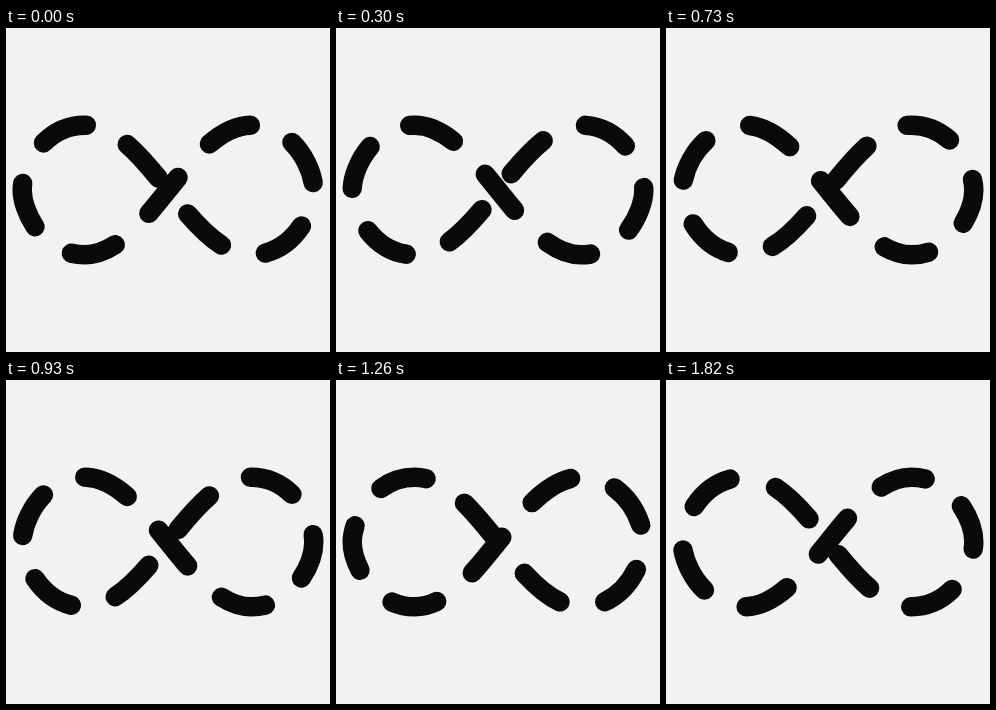
An HTML page that plays this animation: 324x324 px, repeating every 1.85 s.

```html
<!DOCTYPE html>
<html lang="en">
<head>
<meta charset="utf-8">
<title>Infinity loader</title>
<style>
  html, body {
    margin: 0;
    width: 100%;
    height: 100%;
    overflow: hidden;
    background: #f1f2f3;
  }
  svg {
    display: block;
    width: 100%;
    height: 100%;
  }
  /* pathLength is 9, so one unit is one dash plus its gap */
  .track {
    fill: none;
    stroke: #0a0a0a;
    stroke-width: 6;
    stroke-linecap: round;
    stroke-dasharray: 0.5 0.5;
    animation: run 1850ms steps(56, end) -4.9ms infinite;
  }
  @keyframes run {
    from { stroke-dashoffset: 0; }
    to { stroke-dashoffset: 9; }
  }
</style>
</head>
<body>
<svg viewBox="0 0 100 100">
  <path class="track" pathLength="9"
    d="M24.3 30C11.4 30 5 43.3 5 50s6.4 20 19.3 20c19.3 0 32.1-40 51.4-40C88.6 30 95 43.3 95 50s-6.4 20-19.3 20C56.4 70 43.6 30 24.3 30z"/>
</svg>
</body>
</html>
```
